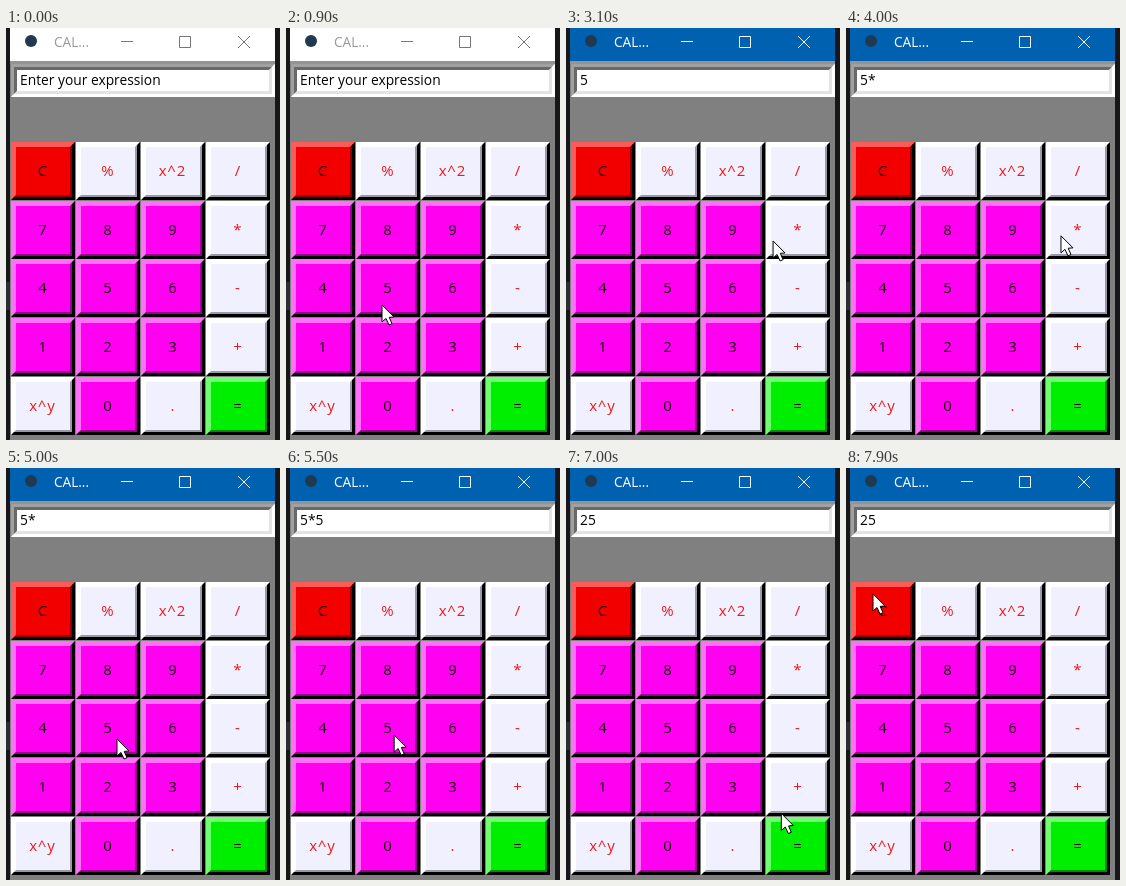
Animation of 274x412 px, one loop 8000 ms. Source, as an HTML page with a canvas:

```html
<!DOCTYPE html>
<html lang="en">
<head>
<meta charset="utf-8">
<title>Calculator</title>
<style>
html, body { margin: 0; width: 100%; height: 100%; overflow: hidden; background: #17171a; }
canvas { display: block; }
</style>
</head>
<body>
<canvas id="stage" width="274" height="412"></canvas>
<script>
const ctx = document.getElementById('stage').getContext('2d');
const LOOP = 8000;
const FONT = '"Open Sans", "Noto Sans", sans-serif';
const KEYS = ['C', '%', 'x^2', '/', '7', '8', '9', '*', '4', '5', '6', '-',
  '1', '2', '3', '+', 'x^y', '0', '.', '='];

// Face, highlight, shade
const WHITE = ['#f0f0ff', '#ffffff', '#9a9aa4'];
const RED = ['#f20000', '#ff5a5a', '#8c0000'];
const PINK = ['#ff00f0', '#ff70f8', '#96008e'];
const GREEN = ['#00ee00', '#70ff70', '#008c00'];

// Time, x, y of the pointer tip
const PATH = [
  [400, 262, 420], [800, 97, 279], [900, 96, 277], [1200, 100, 263], [2200, 100, 263],
  [3100, 207, 213], [3400, 228, 200], [3900, 228, 200], [4800, 112, 270],
  [5000, 111, 271], [5200, 108, 267], [5500, 108, 267], [6400, 248, 362],
  [6600, 239, 373], [6900, 239, 373], [7800, 28, 128], [7900, 27, 126], [8000, 27, 126]
];

// Press time, key, entry text on release
const CLICKS = [[1400, '5', '5'], [3600, '*', '5*'], [5300, '5', '5*5'], [6700, '=', '25']];
const HOLD = 100;

function rect(x, y, w, h, color) {
  ctx.fillStyle = color;
  ctx.fillRect(x, y, w, h);
}

function shape(points, color) {
  ctx.fillStyle = color;
  ctx.beginPath();
  points.forEach(([x, y]) => ctx.lineTo(x, y));
  ctx.closePath();
  ctx.fill();
}

function text(str, x, y, size, color, align = 'left', spacing = 0) {
  ctx.font = `${size}px ${FONT}`;
  ctx.textAlign = align;
  ctx.letterSpacing = spacing + 'px';
  ctx.fillStyle = color;
  ctx.fillText(str, x, y);
}

// Mitred frame: top and left in one colour, bottom and right in another
function bevel(x, y, w, h, d, topLeft, bottomRight) {
  const r = x + w, b = y + h;
  shape([[x, y], [r, y], [r - d, y + d], [x + d, y + d], [x + d, b - d], [x, b]], topLeft);
  shape([[r, b], [x, b], [x + d, b - d], [r - d, b - d], [r - d, y + d], [r, y]], bottomRight);
}

function titleBar(active) {
  const ink = active ? '#ffffff' : '#777777';
  rect(4, 0, 265, 33, active ? '#0061b1' : '#ffffff');
  ctx.fillStyle = '#203850';
  ctx.beginPath();
  ctx.arc(25, 13, 6, 0, 7);
  ctx.fill();
  text('CAL...', 48, 19, 13.6, active ? '#ffffff' : '#999999');
  ctx.strokeStyle = ink;
  ctx.lineWidth = 1;
  ctx.beginPath();
  ctx.moveTo(115, 13.5);
  ctx.lineTo(127, 13.5);
  ctx.rect(173.5, 8.5, 11, 11);
  ctx.moveTo(232, 8);
  ctx.lineTo(244, 20);
  ctx.moveTo(244, 8);
  ctx.lineTo(232, 20);
  ctx.stroke();
}

function entry(value) {
  rect(4, 33, 265, 3, '#949494');
  rect(5, 36, 264, 33, '#ffffff');
  bevel(5, 36, 264, 33, 6, '#a0a0a0', '#ffffff');
  bevel(8, 39, 258, 27, 3, '#696969', '#e3e3e3');
  text(value, 14, 57, 13.8, '#000000');
}

function button(key, i, pressed) {
  const x = 5 + i % 4 * 65;
  const y = Math.round(114 + Math.floor(i / 4) * 58.7);
  const dark = /[0-9C=]/.test(key) && key.length === 1;
  const [face, light, shade] = key === 'C' ? RED : key === '=' ? GREEN : dark ? PINK : WHITE;
  const move = pressed ? 1 : 0;
  rect(x, y, 64, 58, face);
  if (pressed) {
    bevel(x, y, 64, 58, 5, shade, light);
    bevel(x + 3, y + 3, 58, 52, 2, '#000000', face);
  } else {
    bevel(x, y, 64, 58, 5, light, shade);
    bevel(x, y, 64, 58, 3, light, '#000000');
  }
  text(key, x + 31.5 + move, y + 34 + move, 15, dark ? '#18000c' : '#f01818',
    'center', key.length > 1 ? 1 : 0);
}

function pointer(t) {
  const n = PATH.findIndex(p => p[0] > t);
  if (n < 1) return;
  const [t0, x0, y0] = PATH[n - 1], [t1, x1, y1] = PATH[n];
  const k = (t - t0) / (t1 - t0);
  ctx.save();
  ctx.translate(x0 + (x1 - x0) * k, y0 + (y1 - y0) * k);
  ctx.beginPath();
  [[0, 0], [0, 17], [4, 13.5], [7, 20], [10, 18.7], [7.2, 12.4], [12, 12]]
    .forEach(([x, y]) => ctx.lineTo(x, y));
  ctx.closePath();
  ctx.fillStyle = '#ffffff';
  ctx.strokeStyle = '#000000';
  ctx.lineWidth = 1;
  ctx.fill();
  ctx.stroke();
  ctx.restore();
}

function draw(t) {
  rect(0, 0, 274, 412, '#17171a');
  rect(0, 254, 4, 28, '#2a2d36');
  rect(4, 33, 265, 379, '#808080');
  titleBar(t >= CLICKS[0][0]);

  let value = 'Enter your expression', down = '';
  for (const [start, key, result] of CLICKS) {
    if (t >= start && t < start + HOLD) down = key;
    if (t >= start + HOLD) value = result;
  }
  entry(value);
  KEYS.forEach((key, i) => button(key, i, key === down));
  pointer(t);
}

function tick(now) {
  draw(now % LOOP);
  requestAnimationFrame(tick);
}
requestAnimationFrame(tick);
</script>
</body>
</html>
```
